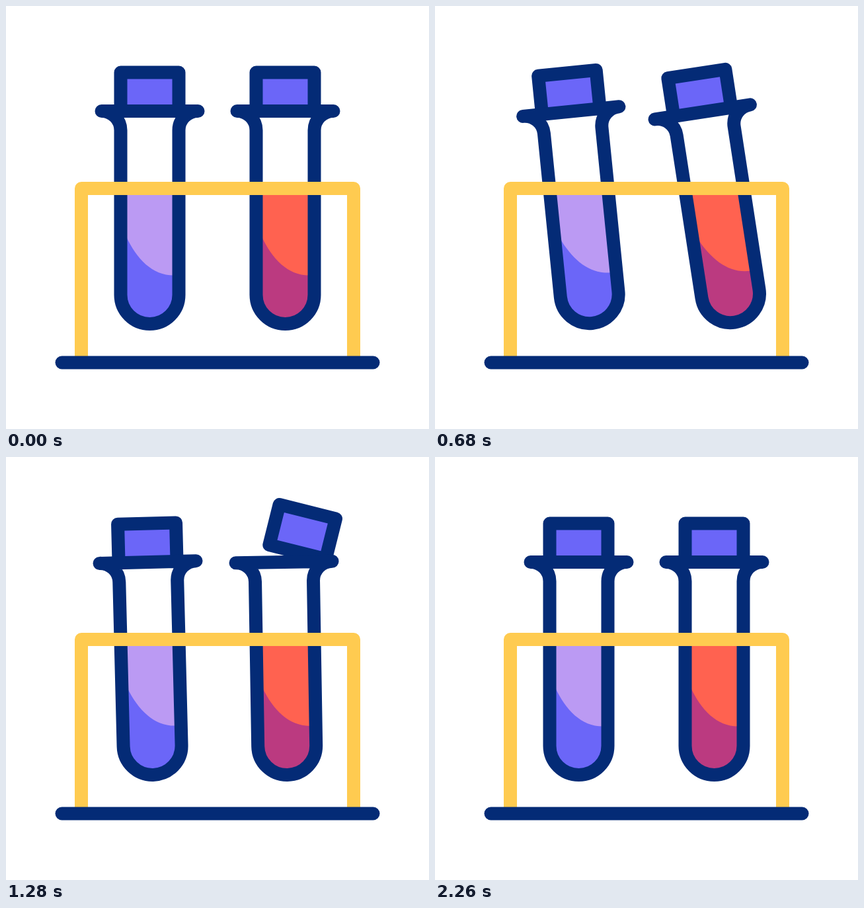
Recreate the animation shown at these times as an HTML page. Size 640 by 640 pixels, loop 2.4 s.

```html
<!DOCTYPE html>
<html lang="en">
<head>
<meta charset="utf-8">
<title>Test tubes</title>
<style>
  html, body { margin: 0; width: 100%; height: 100%; overflow: hidden; background: #fff; }
  svg { display: block; width: 100vw; height: 100vh; }
  .line { stroke: #042b76; stroke-width: 20; stroke-linecap: round; stroke-linejoin: round; fill: none; }
  .rack { stroke: #ffcb50; }
</style>
</head>
<body>
<svg viewBox="0 0 640 640">
  <defs>
    <!-- tube parts are drawn around the swing pivot at 0,0 -->
    <path id="body" d="M-73 -117C-57 -117 -44 -104 -44 -88V161A44 44 0 0 0 44 161V-88C44 -104 57 -117 73 -117Z"/>
    <path id="liquid" d="M-36 0H36V161A36 36 0 0 1 -36 161Z"/>
    <path id="shade" d="M-36 72C-20 107 4 131.5 36 131.5V161A36 36 0 0 1 -36 161Z"/>
    <rect id="cap" x="-44" y="-31.5" width="88" height="63" fill="#6b66f8"/>
  </defs>
  <g id="left">
    <g transform="translate(0 -144)"><use href="#cap" class="line" style="fill:#6b66f8"/></g>
    <use href="#body" fill="#fff"/>
    <use href="#liquid" fill="#bb9af3"/>
    <use href="#shade" fill="#6b66f8"/>
    <use href="#body" class="line"/>
  </g>
  <g id="right">
    <g id="lid"><use href="#cap" class="line" style="fill:#6b66f8"/></g>
    <use href="#body" fill="#fff"/>
    <use href="#liquid" fill="#ff6250"/>
    <use href="#shade" fill="#bb3a80"/>
    <use href="#body" class="line"/>
  </g>
  <path id="steam" class="line rack" d="M421 126C426 108 421 92 416 83C409 72 410 64 415 54C419 47 421 45 421 40"/>
  <path class="line rack" d="M114 536V276H526V536"/>
  <path class="line" d="M84.5 539.5H555.5"/>
</svg>
<script>
  const LOOP = 2400;
  const SWING = [[0, 0], [377, 20], [727, -10], [928, 5], [1155, -2], [1400, 0]];
  const [left, right, lid, steam] = ["left", "right", "lid", "steam"].map(id => document.getElementById(id));
  const steamLength = steam.getTotalLength();

  const part = (t, a, b) => Math.min(1, Math.max(0, (t - a) / (b - a)));
  const ease = u => (1 - Math.cos(Math.PI * u)) / 2;

  function swing(t) {
    let angle = 0;
    for (let i = 1; i < SWING.length; i++) {
      const [a, from] = SWING[i - 1], [b, to] = SWING[i];
      angle += (to - from) * ease(part(t, a, b));
    }
    return angle;
  }

  // The lid pops off smoothly and drops back with gathering speed.
  function lift(t) {
    return t < 1590 ? ease(part(t, 1100, 1590)) : 1 - part(t, 1590, 2245) ** 2.1;
  }

  function place(el, x, y, angle) {
    el.setAttribute("transform", `translate(${x} ${y}) rotate(${angle})`);
  }

  function draw(t) {
    place(left, 217.5, 276, swing(t - 40));
    place(right, 422.5, 276, swing(t));

    const p = lift(t);
    place(lid, 96 * p, -144 - 61 * p, 50 * p);

    const head = ease(part(t, 1420, 1720)) * steamLength;
    const tail = ease(part(t, 1640, 2000)) * steamLength;
    const shown = head - tail;
    steam.style.display = shown > 0.1 ? "" : "none";
    steam.setAttribute("stroke-dasharray", `${Math.max(shown, 0.1)} 1000`);
    steam.setAttribute("stroke-dashoffset", -tail);
  }

  const start = performance.now();
  function tick(now) {
    draw(Math.max(0, now - start) % LOOP);
    requestAnimationFrame(tick);
  }
  draw(0);
  requestAnimationFrame(tick);
</script>
</body>
</html>
```
